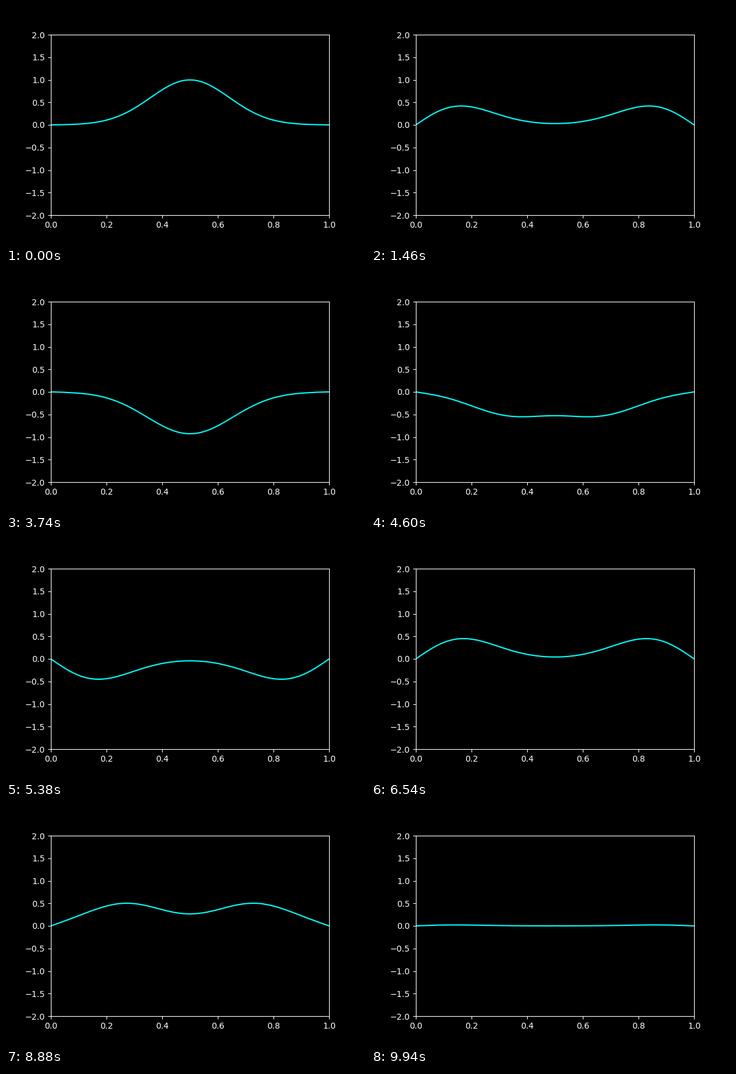
A matplotlib script that plays this animation: 600x400 px, repeating every 9960 ms.

```python
import matplotlib.pyplot as plt
import numpy as np
from matplotlib.animation import FuncAnimation

FRAMES = 498
INTERVAL = 20        # ms per frame
SPEED = 0.25         # string lengths per second
LEAD = 2             # time steps already elapsed when the loop starts

plt.style.use("dark_background")
fig, ax = plt.subplots(figsize=(6, 4), dpi=100)
fig.subplots_adjust(left=0.125, right=0.9, bottom=0.125, top=0.88)
ax.set_xlim(0, 1)
ax.set_ylim(-2, 2)

x = np.linspace(0, 1, 101)
line, = ax.plot(x, np.zeros_like(x), color="cyan", lw=1.5)


def pulse(s):
    """Gaussian pulse on [0, 1], extended as an odd function of period 2."""
    s = (s + 1) % 2 - 1
    return np.sign(s) * np.exp(-25 * (np.abs(s) - 0.5) ** 2)


def string(t):
    """d'Alembert solution for a plucked string with fixed ends."""
    shift = SPEED * t
    u = (pulse(x - shift) + pulse(x + shift)) / 2
    u[0] = u[-1] = 0
    return u


def update(frame):
    line.set_ydata(string((frame + LEAD) * INTERVAL / 1000))
    return line,


anim = FuncAnimation(fig, update, frames=FRAMES, interval=INTERVAL,
                     repeat=True, repeat_delay=0)
plt.show()
```
